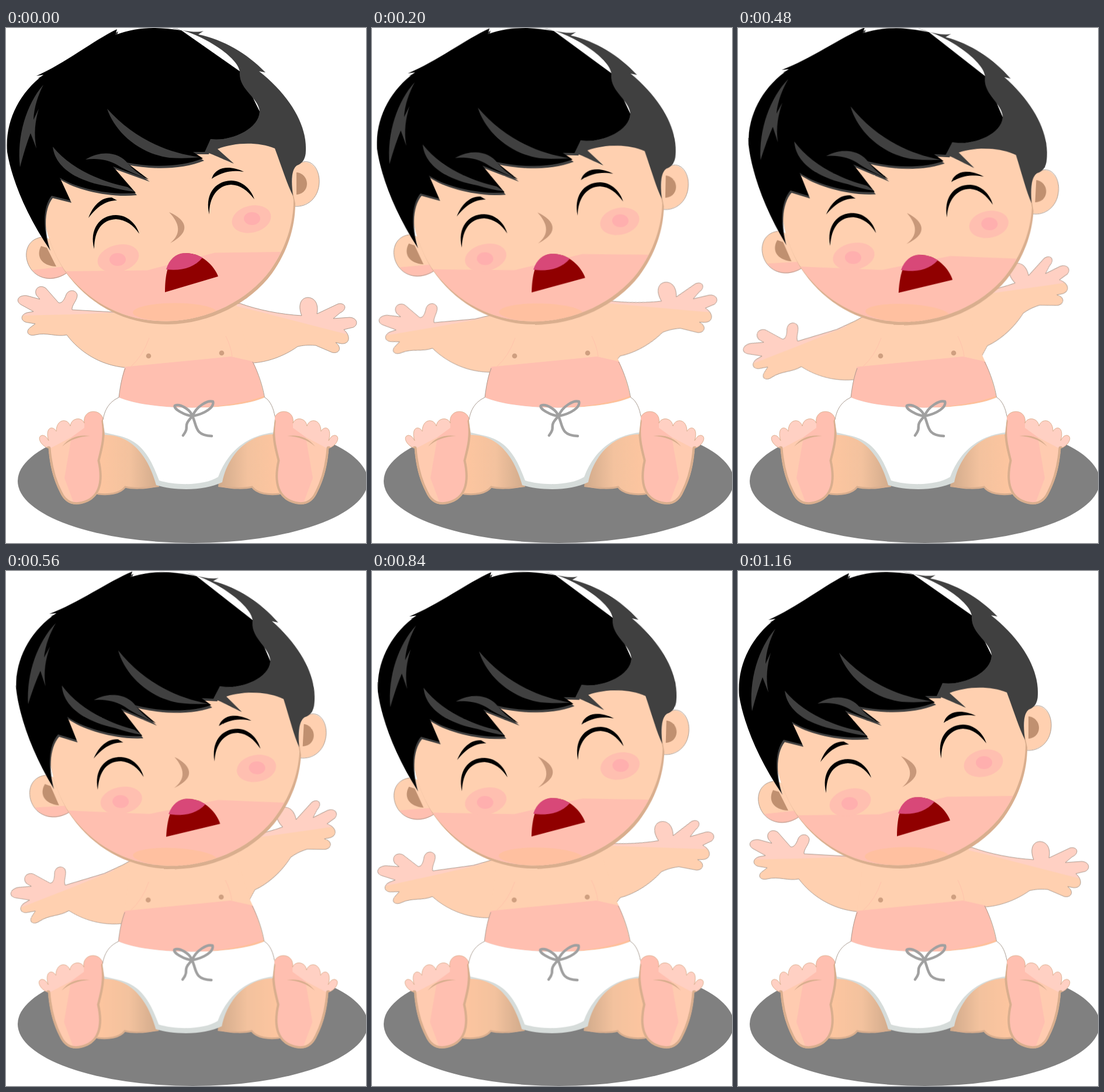
An HTML page without scripts for the animation above (1.2 s loop, 616 by 881 pixels).

```html
<!DOCTYPE html>
<html lang="en">
<head>
<meta charset="utf-8">
<title>Crying baby</title>
<style>
  html, body { margin: 0; width: 100%; height: 100%; overflow: hidden; background: #fff; }
  svg { display: block; width: 100%; height: 100%; }

  .head, .arm { animation: sway 1.2s infinite; }
  .head  { --a: 3.05deg;  transform-origin: 256px 505px; }
  .left  { --a: -20deg;   transform-origin: 260px 540px; }
  .right { --a: -22.5deg; transform-origin: 350px 544px; }
  .baby  { animation: settle 1.2s step-end infinite; }

  @keyframes sway {
    0%      { transform: rotate(0deg); animation-timing-function: steps(12); }
    40%     { transform: rotate(var(--a)); animation-timing-function: steps(1); }
    43.333% { transform: rotate(calc(var(--a) * 1.0625)); animation-timing-function: steps(4); }
    56.667% { transform: rotate(calc(var(--a) * .8125)); animation-timing-function: steps(7); }
    80%     { transform: rotate(calc(var(--a) * .358)); animation-timing-function: steps(5); }
    96.667%, 100% { transform: rotate(0deg); }
  }
  @keyframes settle {
    0%      { transform: none; }
    46.667% { transform: translate(-.7px, 1.7px); }
    96.667% { transform: translate(0, 1.7px); }
    100%    { transform: none; }
  }

  .peach { fill: #ffd0b0; }
  .pink  { fill: #ffbfb0; }
  .pale  { fill: #ffd0c3; }
  .tan   { fill: #d9ae8e; }
  .brown { fill: #c09070; }
  .grey  { fill: #404040; }
  .line  { fill: none; stroke: #a39488; stroke-width: .9; }
  .fold  { fill: none; stroke: #d9ae8e; stroke-width: 4; stroke-linecap: round; }
  .bow   { fill: none; stroke: #a0a0a0; stroke-width: 4.5; stroke-linecap: round; stroke-linejoin: round; }
</style>
</head>
<body>
<svg viewBox="0 0 616 881" preserveAspectRatio="none">
  <defs>
    <path id="armL" d="M250 478L218 483 183 486 113 482C112 474 122 466 122 457C120 447 107 447 103 456C99 467 95 471 90 470L68 445C58 438 47 446 52 457L58 464 36 458C20 456 15 468 27 474L47 485 36 487C23 491 25 503 38 504L50 506 42 512C32 519 38 528 50 525C70 520 86 529 104 525C125 553 160 577 205 581L245 577Z"/>
    <path id="armR" d="M345 480L400 471C430 482 470 490 506 492C499 475 504 461 517 461C531 462 535 476 532 489L568 472C582 469 584 482 572 487L560 497 588 495C604 496 603 512 590 513L578 516C590 526 589 541 574 540L564 538C576 547 570 558 558 555L530 543C515 542 508 543 499 545C475 562 446 572 421 573L405 586 345 580Z"/>
    <path id="torso" d="M215 490L392 480 418 560C432 590 440 615 443 637C400 655 240 655 193 633C195 615 198 598 204 578Z"/>
    <path id="face" d="M62 285C62 340 80 385 102 418C145 476 205 507 277 507C350 506 418 470 455 420C482 382 495 340 495 300L470 180H340L100 200Z"/>
    <path id="foot" d="M134 676C130 651 165 649 167 673C171 700 165 720 160 740C165 762 168 797 140 810C115 821 100 811 93 795C80 770 75 745 73 719C60 715 52 700 61 697C67 696 70 701 73 706C66 683 80 679 86 690C86 668 106 667 110 681C112 666 130 665 134 676Z"/>
    <path id="locks" d="M2 212C-2 160 22 112 64 80L52 82C100 61 150 21 190 2L187 12C225 -3 260 -2 300 4L400 74 434 143C433 175 380 195 350 190L345 212 320 212 337 223C300 238 250 239 206 230L244 259 183 237 222 282C175 287 118 273 92 256L110 295 78 287C64 304 62 340 74 377C35 320 10 260 2 212Z"/>
    <linearGradient id="shade">
      <stop offset="0" stop-color="#ffc6a0"/><stop offset=".55" stop-color="#f3c29e"/><stop offset="1" stop-color="#d0aa8b"/>
    </linearGradient>
    <clipPath id="inArmL"><use href="#armL"/></clipPath>
    <clipPath id="inArmR"><use href="#armR"/></clipPath>
    <clipPath id="inTorso"><use href="#torso"/></clipPath>
    <clipPath id="inFace"><use href="#face"/></clipPath>
    <clipPath id="inFoot"><use href="#foot"/></clipPath>
    <g id="leg">
      <path fill="url(#shade)" d="M160 692C215 686 256 720 262 785C240 788 215 788 204 785C195 797 175 800 150 797Z"/>
      <path class="fold" d="M254 784C238 788 215 788 204 785C195 797 175 799 158 797" style="stroke-width:3"/>
      <use href="#foot" class="pink"/>
      <g clip-path="url(#inFoot)">
        <path class="pale" d="M50 650H134V684L112 700 72 722H50Z"/>
        <path fill="#ffcbb0" d="M70 722L112 700 100 770 118 818H85Z"/>
        <path class="fold" d="M167 673C171 700 165 720 160 740C165 762 168 797 140 810C115 821 100 811 93 795C80 770 75 745 73 719" style="stroke-width:7"/>
      </g>
      <use href="#foot" class="line" style="stroke:#d9ae8e"/>
      <path class="tan" d="M96 716C108 700 125 695 144 698C124 699 110 704 96 716Z"/>
    </g>
  </defs>

  <ellipse cx="319.5" cy="775" rx="299.5" ry="106" fill="#808080"/>

  <g class="baby">
    <g class="arm left">
      <use href="#armL" class="peach"/>
      <path class="pale" clip-path="url(#inArmL)" d="M0 430H200V487L110 490 20 492Z"/>
      <use href="#armL" class="line"/>
    </g>
    <g class="arm right">
      <use href="#armR" class="peach"/>
      <path class="pale" clip-path="url(#inArmR)" d="M395 450H616V532L560 518 440 487 395 476Z"/>
      <use href="#armR" class="line"/>
    </g>

    <use href="#torso" class="peach"/>
    <g clip-path="url(#inTorso)">
      <path class="pink" d="M190 581L385 562 425 571 450 660H180Z"/>
      <path fill="#ffc09a" d="M320 650C370 648 415 640 445 628V660H320Z"/>
    </g>
    <path class="line" d="M204 582C198 598 195 615 193 633M422 571C432 590 440 615 443 635"/>
    <path fill="none" stroke="#ffc3ac" d="M245 530Q235 560 213 580M376 527Q385 545 387 562"/>
    <g fill="#cf9f80">
      <circle cx="244" cy="561" r="4.3"/><circle cx="369" cy="556" r="4.3"/>
    </g>

    <use href="#leg"/>
    <use href="#leg" transform="translate(625 0) scale(-1 1)"/>
    <path fill="#d6dcda" d="M193 632C176 640 168 655 166 672L169 696C215 696 243 732 257 782C290 792 340 792 370 777C378 735 410 696 457 695L460 667C456 650 450 637 443 632C390 655 250 656 193 632Z"/>
    <path fill="#fff" d="M193 632C176 640 168 655 166 672L169 692 195 698C235 708 249 740 262 774C290 783 340 783 363 768C380 722 415 697 457 692L460 667C456 650 450 637 443 632C390 655 250 656 193 632Z"/>
    <path class="line" d="M193 632C176 640 169 653 166 670M443 632C453 638 458 652 460 664"/>
    <path class="bow" d="M319 664C304 662 286 651 289 646C297 642 315 652 319 664C326 647 345 636 354 639C357 649 340 660 319 664C300 684 316 680 303 697M319 664C327 680 322 697 352 698"/>

    <g class="head">
      <path class="peach" d="M490 240C515 215 537 238 536 264C535 292 514 308 488 304Z"/>
      <path class="line" d="M498 234C520 218 537 240 536 264C535 292 514 307 494 305"/>
      <path class="brown" d="M497 247C520 249 522 283 497 285Z"/>
      <path class="peach" d="M64 357C35 360 29 388 40 408C52 430 82 436 106 418L85 365Z"/>
      <path class="pink" d="M45 414C60 433 85 434 106 418L100 408Z"/>
      <path class="line" d="M60 358C35 362 29 388 40 408C52 430 80 435 104 419"/>

      <use href="#face" class="tan"/>
      <g clip-path="url(#inFace)">
        <use href="#face" class="peach" x="-3" y="-5.5"/>
        <g transform="translate(-3 -5.5)" clip-path="url(#inFace)">
          <path class="pink" d="M80 422L245 420 360 390 510 388V520H80Z"/>
          <ellipse fill="#ffc0a0" cx="292" cy="492" rx="72" ry="16"/>
        </g>
      </g>
      <path class="brown" d="M60 373C51 390 60 407 86 408L70 376Z"/>
      <g class="pink">
        <ellipse cx="420" cy="327" rx="34" ry="23" transform="rotate(-14 420 327)"/>
        <ellipse cx="192" cy="394" rx="36" ry="23" transform="rotate(-14 192 394)"/>
      </g>
      <g fill="#ffafae">
        <ellipse cx="421" cy="326" rx="14" ry="11"/><ellipse cx="191" cy="396" rx="14" ry="11"/>
      </g>

      <use href="#locks" class="grey" x="2" y="4"/>
      <use href="#locks"/>
      <g class="grey">
        <path d="M280 -1C305 5 325 9 338 5L329 11C372 20 412 43 444 76L433 74C485 115 515 165 513 210C513 225 506 232 498 235C488 242 488 262 491 287C480 265 471 235 460 206C430 194 390 196 362 207L390 232C365 222 350 214 340 212L350 190C380 195 433 175 434 143C432 118 397 106 400 74C396 48 330 6 280 -1Z"/>
        <path d="M64 97C35 130 18 185 24 238Q33 203 42 180L52 206C47 180 50 160 56 138L47 157C48 135 55 115 64 97Z"/>
        <path d="M173 138C185 175 225 215 280 222Q305 224 332 221C270 213 215 185 173 138Z"/>
        <path d="M136 225C165 207 195 214 208 231Q222 248 242 258Q205 244 190 234C175 225 155 222 136 225Z"/>
        <path d="M80 203C84 238 120 262 175 271Q200 278 221 280L208 272C160 262 110 240 80 203Z"/>
      </g>

      <path d="M151 378C142 345 160 320 188 320C208 320 223 335 228 352C218 337 205 328 188 327C165 328 151 345 151 378Z"/>
      <path d="M348 319C340 288 355 262 385 261C405 261 420 277 425 293C412 277 402 269 385 268C362 269 347 290 348 319Z"/>
      <path d="M141 325C149 303 164 289 181 290L190 295C172 295 157 304 141 325Z"/>
      <path d="M352 258C357 239 380 233 407 246C385 242 368 247 352 258Z"/>
      <path fill="#c8987a" d="M279 315C303 325 323 346 281 368C300 352 298 335 279 315Z"/>
      <path fill="#900000" d="M272 452C272 415 280 390 300 386C330 381 355 404 363 425Z"/>
      <path fill="#d84878" d="M274 413C279 396 290 386 305 385C319 385 328 388 336 393C322 410 300 416 274 413Z"/>
    </g>
  </g>
</svg>
</body>
</html>
```
